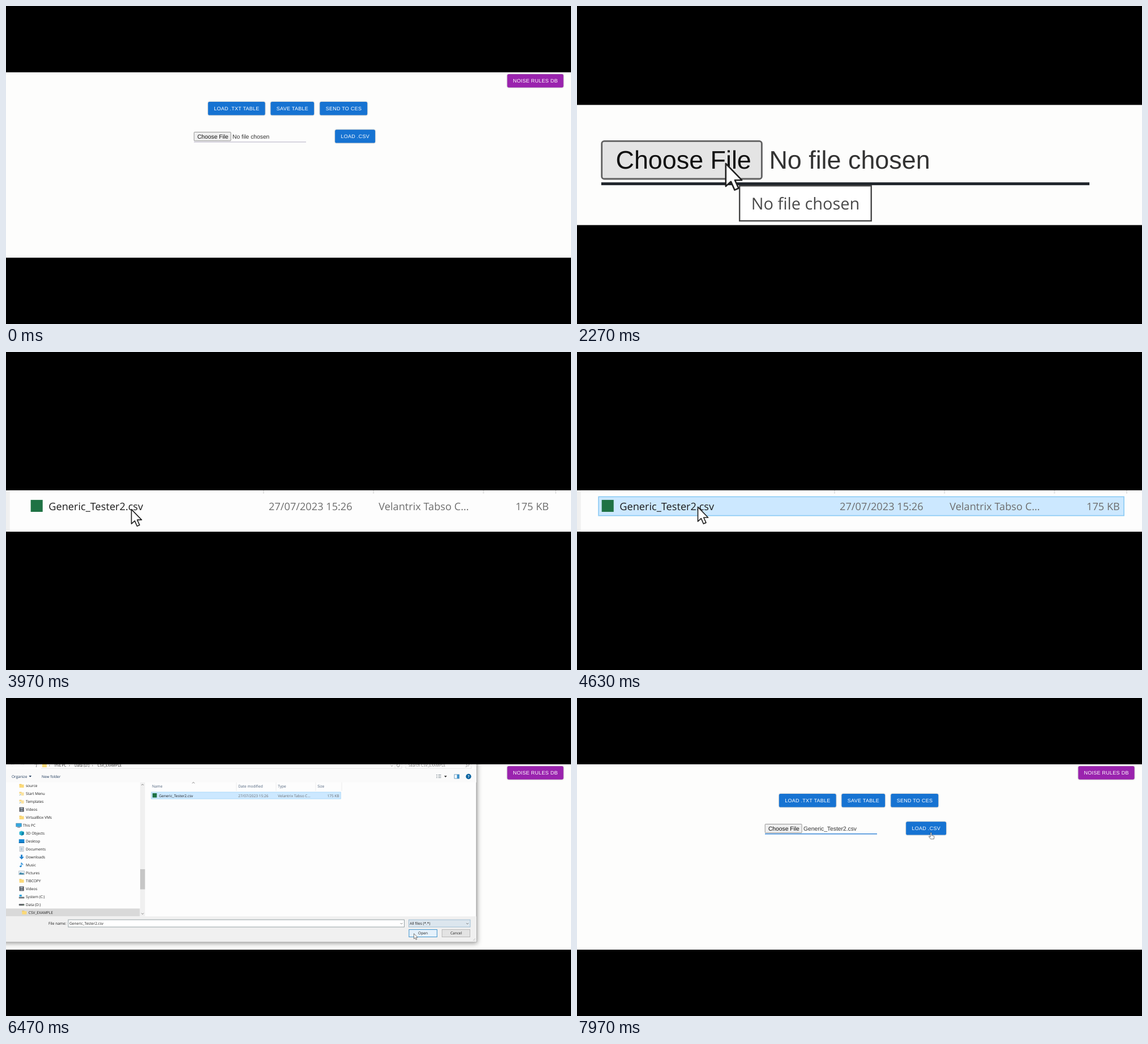
These frames come from a looping animation (998 px wide and 561 px high, 8 s). An HTML page:

```html
<!DOCTYPE html>
<html lang="en">
<head>
<meta charset="utf-8">
<title>CSV upload</title>
<style>
html, body { margin: 0; width: 100%; height: 100%; overflow: hidden; background: #000; }
svg { display: block; width: 100vw; height: 100vh; }
text { text-rendering: geometricPrecision; white-space: pre; }
.btn { font: 9px "Liberation Sans", Arial, sans-serif; letter-spacing: .02857em; fill: #fff; }
.form { font: 10.3px "Liberation Sans", Arial, sans-serif; fill: #111; }
.ui { font: 6.55px "Open Sans", "Noto Sans", sans-serif; fill: #1c1c1c; }
.head { fill: #4c607a; }
.dim { fill: #6d6d6d; }
.nav { fill: #1e395b; }
.mid { text-anchor: middle; }
.end { text-anchor: end; }
.raised { filter: drop-shadow(0 .9px .9px rgba(0,0,0,.36)); }
.window { filter: drop-shadow(1px 2px 4px rgba(0,0,0,.4)); }
.line { fill: none; stroke: #555; stroke-width: .7; }
</style>
</head>
<body>
<svg viewBox="0 0 998 561" preserveAspectRatio="none">
  <rect width="998" height="561" fill="#fdfdfc"/>
  <g id="camera"></g>
  <rect id="barTop" width="998"/>
  <rect id="barBottom" width="998" height="561"/>
</svg>
<script>
const LOOP = 8000;
const $ = id => document.getElementById(id);

const rect = (x, y, w, h, fill, extra = '') =>
  `<rect x="${x}" y="${y}" width="${w}" height="${h}" fill="${fill}" ${extra}/>`;
const text = (x, y, str, cls, extra = '') =>
  `<text x="${x}" y="${y}" class="${cls}" ${extra}>${str}</text>`;
const path = (d, extra = 'class="line"') => `<path d="${d}" ${extra}/>`;
const group = (id, body, extra = '') => `<g id="${id}" ${extra}>${body}</g>`;
const chevron = (x, y, dir = 1) => path(`M${x - 2} ${y - dir}l2 ${2 * dir}l2 ${-2 * dir}`);

const button = (x, y, w, label, fill = '#1673d2') =>
  rect(x, y, w, 23.4, fill, 'rx="2.6" class="raised"') +
  text(x + w / 2 + .1, y + 14.9, label, 'btn mid');

function page() {
  return button(885.4, 120.3, 99.2, 'NOISE RULES DB', '#9a23ae') +
    button(356.9, 169.1, 100.7, 'LOAD .TXT TABLE') +
    button(467.5, 169.1, 76.6, 'SAVE TABLE') +
    button(554.4, 169.1, 83.8, 'SEND TO CES') +
    button(581.2, 218.2, 70.9, 'LOAD .CSV') +
    rect(332.2, 222.5, 64.9, 15.3, '#efefef', 'id="choose" rx="1" stroke="#606060" stroke-width=".65"') +
    text(337.9, 233.6, 'Choose File', 'form') +
    text(400.1, 233.6, 'No file chosen', 'form', 'id="chosen" style="fill:#333"') +
    '<rect id="underline" x="332" width="198"/>';
}

// Small icons drawn around their centre.
const icons = {
  folder: rect(-4, -3, 4, 2, '#e8b84c') + rect(-4, -2.2, 8, 5.6, '#fbd978'),
  link: rect(-4, -3, 4, 2, '#e8b84c') + rect(-4, -2.2, 8, 5.6, '#fbe3a0') +
    rect(-4, .6, 3, 3, '#fff') + path('M-3.5 3l2-2', 'stroke="#1874c4" stroke-width=".8"'),
  film: rect(-4, -4, 8, 8, '#4d4f55') + rect(-2.3, -3.2, 4.6, 2.8, '#9aa7b5') + rect(-2.3, .5, 4.6, 2.8, '#8492a0'),
  pc: rect(-4.8, -3.6, 9.6, 6, '#35a8e0', 'stroke="#4e6f86" stroke-width=".5"') + rect(-2.4, 3, 4.8, 1, '#667'),
  cube: path('M0-4.2L4-2.5V2.5L0 4.2L-4 2.5V-2.5Z', 'fill="#28b2cf"') + path('M0-1L4-2.5V2.5L0 4.2Z', 'fill="#0d83a8"'),
  desktop: rect(-4.8, -3.4, 9.6, 6.8, '#1587d4') + rect(-4.8, 2, 9.6, 1.4, '#0b62a4'),
  doc: rect(-3.5, -4, 7, 8, '#f4f6f8', 'stroke="#8b98a5" stroke-width=".6"') +
    path('M-2-1.8h4M-2 0h4M-2 1.8h4', 'stroke="#5f88aa" stroke-width=".7"'),
  down: path('M-1.5-4h3v3.6h2.8L0 4.2L-4.3-.4h2.8Z', 'fill="#2382cf"'),
  music: path('M-.6 2.8V-4c.6 2 3 1.8 2.8 4.2', 'fill="none" stroke="#1b87d6" stroke-width="1.1"') +
    '<ellipse cx="-1.8" cy="2.6" rx="1.8" ry="1.4" fill="#1b87d6"/>',
  picture: rect(-4.8, -3.4, 9.6, 6.8, '#e9f1f6', 'stroke="#8495a2" stroke-width=".5"') +
    path('M-4 2.7V.6l2.6-1.6L1 .8l1.4-.9L4 1V2.7Z', 'fill="#3d86a8"'),
  system: rect(-4.8, .4, 9.6, 2.8, '#6f777d') + rect(-4, -3.4, 4.2, 3.2, '#29a4df'),
  drive: rect(-4.8, -1, 9.6, 3, '#5b6064', 'rx=".8"') + rect(2.5, .5, 1.4, .7, '#7ed36c')
};
const icon = (kind, x, y) => `<g transform="translate(${x} ${y})">${icons[kind]}</g>`;

const places = [
  ['folder', 'source'], ['link', 'Start Menu'], ['link', 'Templates'], ['film', 'Videos'],
  ['folder', 'VirtualBox VMs'], ['pc', 'This PC', -5], ['cube', '3D Objects'], ['desktop', 'Desktop'],
  ['doc', 'Documents'], ['down', 'Downloads'], ['music', 'Music'], ['picture', 'Pictures'],
  ['folder', 'TIBCOPY'], ['film', 'Videos'], ['system', 'System (C:)'], ['drive', 'Data (D:)'],
  ['folder', 'CSV_EXAMPLE', 4.8]
];

function addressBar() {
  return rect(0, 100, 831, 26, '#fdfdfd') +
    path('M9 118h6m-6 0l2.5-2.5m-2.5 2.5l2.5 2.5M32 118h-6m6 0l-2.5-2.5m2.5 2.5l-2.5 2.5', 'class="line" style="stroke:#ddd"') +
    path('M53.5 122v-7l-2.5 2.5m2.5-2.5l2.5 2.5') + icon('folder', 68, 118.8) +
    path('M62 124.3H699M706 124.3H822M687 110v14.3M699 110v14.3M706 110v14.3M822 110v14.3', 'class="line" style="stroke:#ddd"') +
    text(84.5, 121.2, 'This PC', 'ui') + text(121, 121.2, 'Data (D:)', 'ui') +
    text(161.5, 121.2, 'CSV_EXAMPLE', 'ui') + text(111, 121, '›', 'ui') + text(152, 121, '›', 'ui') +
    text(76, 121, '›', 'ui') + chevron(681.5, 119.5) +
    path('M695 117.5a2.5 2.5 0 1 1-2-1.2') +
    text(711, 121.2, 'Search CSV_EXAMPLE', 'ui dim') +
    path('M812 122l2.5-2.5a2 2 0 1 1 1 .5');
}

function toolbar() {
  return rect(0, 126, 831, 23, '#fafafa') +
    text(10, 140.6, 'Organize', 'ui nav') + path('M40.5 137h4.6l-2.3 2.8Z', 'fill="#1e395b"') +
    text(63, 140.6, 'New folder', 'ui nav') +
    path('M760 135.5h2m1.5 0h5M760 138h2m1.5 0h5M760 140.5h2m1.5 0h5', 'stroke="#8b969e" stroke-width="1"') +
    path('M774 137.2h4.8l-2.4 2.9Z', 'fill="#222"') +
    rect(792, 135, 8.5, 7, '#fff', 'stroke="#4d87ad" stroke-width=".8"') + rect(796.5, 135, 4, 7, '#3c91cb') +
    '<circle cx="817" cy="138.5" r="4.7" fill="#08629f"/>' +
    text(817, 141.1, '?', 'ui mid', 'style="fill:#fff;font-weight:700"');
}

function sidebar() {
  return rect(0, 371.4, 236.5, 13.8, '#d9d9d9') +
    places.map(([kind, label, dx = 0], i) => {
      const y = 154.8 + i * 13.97;
      return icon(kind, 27.6 + dx, y) + text(35 + dx, y + 2.3, label, 'ui');
    }).join('') +
    rect(237, 149, 8.5, 236, '#f0f0f0') + rect(237, 302, 8.5, 35.5, '#c6c6c6') +
    chevron(241.2, 153, -1) + chevron(241.2, 380.5);
}

function fileList() {
  return rect(256.8, 166, 334.4, 12, '#cce8ff', 'id="selected" stroke="#8ccbf4" stroke-width=".6"') +
    path('M407 149v15M477 149v15M547 149v15M593 149v15', 'stroke="#e2e2e2" stroke-width=".7"') +
    path('M328.7 150.6l2.3-2l2.3 2') +
    [[258, 'Name'], [410.3, 'Date modified'], [480.3, 'Type'], [550.3, 'Size']]
      .map(([x, label]) => text(x, 157.6, label, 'ui head')).join('') +
    rect(258.8, 168, 7.6, 7.6, '#1f7244') +
    text(270.2, 174.6, 'Generic_Tester2.csv', 'ui') +
    text(410.3, 174.6, '27/07/2023 15:26', 'ui dim') +
    text(480.3, 174.6, 'Velantrix Tabso C...', 'ui dim') +
    text(588.6, 174.6, '175 KB', 'ui dim end');
}

function footer() {
  const box = 'stroke="#adadad" stroke-width=".8"';
  return rect(0, 385.3, 831, 45, '#f0f0f0') +
    text(106.3, 400, 'File name:', 'ui end') +
    rect(110, 391.2, 593.5, 12.8, '#fff', 'id="nameBox" stroke-width=".9"') +
    text(112, 400.2, 'Generic_Tester2.csv', 'ui', 'id="fileName"') +
    rect(112, 393.4, .7, 8.6, '#111', 'id="caret"') + chevron(698.5, 398) +
    rect(711.4, 391.2, 108.6, 12.8, '#e4e4e4', `id="filter" ${box}`) +
    text(713.3, 400.1, 'All files (*.*)', 'ui') + chevron(815, 398) +
    rect(711.9, 408.4, 49.4, 13.2, '#e3e3e3', 'id="open" stroke="#1a7fc4"') +
    text(736.5, 417.3, 'Open', 'ui mid') +
    rect(770.2, 408.4, 49.4, 13.2, '#e3e3e3', box) +
    text(795, 417.3, 'Cancel', 'ui mid') +
    path('M825 428l4-4M827.5 428l1.5-1.5', 'stroke="#bbb" stroke-width=".8"');
}

const dialog = () =>
  rect(-10, 90, 841, 340.3, '#fdfdfd', 'class="window" stroke="#8a8a8a" stroke-width=".8"') +
  addressBar() + toolbar() + sidebar() + fileList() + footer();

const tooltip = () =>
  rect(388.1, 240.6, 53.4, 14.2, '#fff', 'stroke="#444" stroke-width=".55"') +
  text(392.8, 250.2, 'No file chosen', 'ui', 'style="fill:#4a4a4a;font-size:6.65px"');

const pointer = 'fill="#fff" stroke="#222" stroke-width=".6" stroke-linejoin="round"';
const arrow = path('M0 0V9.2L2.1 7.3L3.6 10.7L5.2 10L3.7 6.7H6.5Z', pointer);
const hand = path('M-1 .5q1-1.2 2 0V5l3.6 1q1.2.4 1 1.6L5 11.5H-.5L-3.6 7.6q-.4-1.5 1.2-.9L-1 7.8Z', pointer);

$('camera').innerHTML = page() + group('dialog', dialog()) + group('tip', tooltip()) +
  group('cursor', group('arrow', arrow) + group('hand', hand));

// time, scale, shift x, shift y, visible top, visible bottom
const shots = [
  [0, 1, 0, 0, 117, 444],
  [1270, 4.355, -1403, -730.6, 174.5, 386.5],
  [2600, 1, 0, 0, 117, 444],
  [3550, 2.775, -674.5, -205.3, 244, 317],
  [4730, 1, 0, 0, 117, 444]
];
// time, x, y of the pointer tip
const route = [
  [300, 430, 348], [850, 382.5, 231.6], [2780, 382.5, 231.6], [2970, 351.5, 198.5],
  [3450, 345, 188], [3970, 322.9, 174], [4150, 320, 172.5], [4650, 320, 172.5],
  [5130, 717.3, 400], [5900, 718, 401], [6470, 720.5, 415.6], [7030, 722, 416],
  [7550, 625.3, 237.3], [8000, 625.3, 237.3]
];

const ease = p => p * p * (3 - 2 * p);

function pointerAt(t) {
  const i = route.findIndex(k => k[0] > t);
  if (i < 1) return route[0].slice(1);
  const [t0, x0, y0] = route[i - 1], [t1, x1, y1] = route[i];
  const p = ease((t - t0) / (t1 - t0));
  return [x0 + (x1 - x0) * p, y0 + (y1 - y0) * p];
}

const show = (id, on) => $(id).setAttribute('visibility', on ? 'inherit' : 'hidden');
function set(id, attrs) {
  for (const name in attrs) $(id).setAttribute(name, attrs[name]);
}

function render(t) {
  const within = (from, to) => t >= from && t < to;
  const [, scale, dx, dy, top, bottom] = shots.filter(s => s[0] <= t).pop();
  set('camera', { transform: `translate(${dx} ${dy}) scale(${scale})` });
  set('barTop', { height: top });
  set('barBottom', { y: bottom });

  const [x, y] = pointerAt(t);
  const onLoad = t >= 7480;
  set('cursor', { transform: `translate(${x} ${y})` });
  show('cursor', t >= 300);
  show('arrow', t >= 300 && !onLoad);
  show('hand', onLoad);

  const hover = within(800, 2780), loaded = t >= 7050;
  const picked = t >= 4400;
  set('choose', { fill: hover ? '#e4e4e4' : '#efefef' });
  set('underline', hover ? { y: 239.2, height: 1.15, fill: '#20252b' }
    : loaded ? { y: 239.1, height: 1.3, fill: '#1976d2' }
    : { y: 239.6, height: .7, fill: '#8f88a8' });
  $('chosen').textContent = loaded ? 'Generic_Tester2.csv' : 'No file chosen';

  show('tip', within(1800, 2600));
  show('dialog', within(2780, 7050));
  show('selected', picked);
  show('fileName', picked);
  show('caret', !picked);
  set('nameBox', { stroke: picked ? '#8a989c' : '#3a94c4' });
  set('filter', { fill: t >= 5200 ? '#dce6ee' : '#e4e4e4', stroke: t >= 5200 ? '#8fb3cc' : '#adadad' });
  const onOpen = t >= 6300;
  set('open', { fill: onOpen ? '#e5f1fb' : '#e3e3e3', 'stroke-width': onOpen ? .8 : 1.4 });
}

function tick(now) {
  render(now % LOOP);
  requestAnimationFrame(tick);
}
render(0);
requestAnimationFrame(tick);
</script>
</body>
</html>
```
